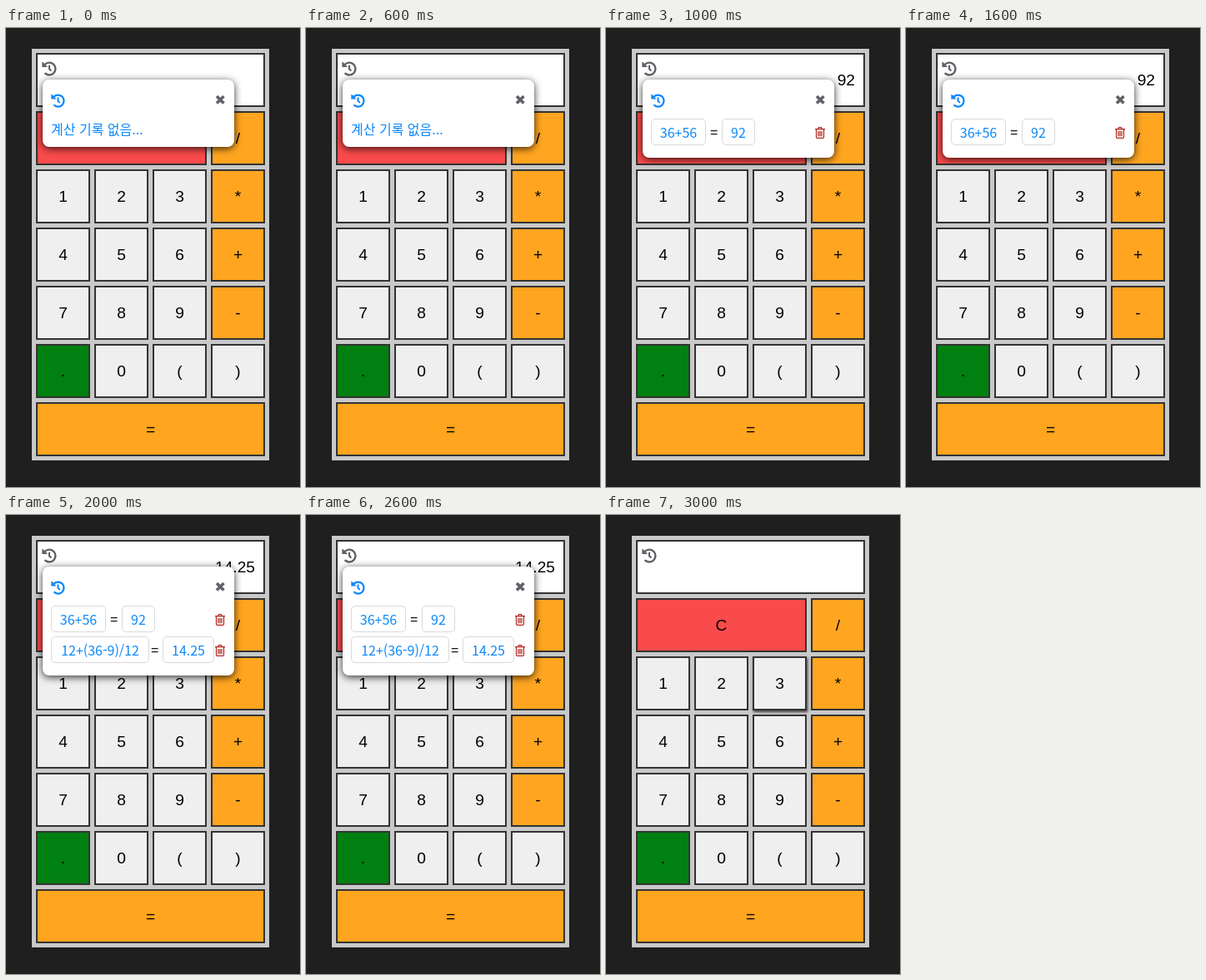
Write an HTML page that moves like this. It is 353 px wide and 552 px high and loops after 4 s.

```html
<!DOCTYPE html>
<html lang="ko">
<head>
<meta charset="utf-8">
<title>Calculator</title>
<style>
html, body { margin: 0; width: 100%; height: 100%; overflow: hidden; background: #1f1f1f; }
body { position: relative; font-family: "Liberation Sans", Arial, sans-serif; }
div, span, svg { position: absolute; box-sizing: border-box; }
#calc { left: 31px; top: 25px; width: 285px; height: 495px; background: #c9c9c9; }
.key {
  height: 65px; border: 2px solid #333; background: #efefef; color: #000;
  font-size: 19.2px; display: flex; align-items: center; justify-content: center;
}
.op { background: #ffa520; }
.clear { background: #f94b4b; }
.dot { background: #008010; }
.hover { box-shadow: 1px 2px 3px rgba(0,0,0,.7); }
#out { background: #fff; justify-content: flex-end; padding-right: 10px; }
#panel {
  left: 44px; top: 62px; width: 230px; border-radius: 8px; background: #fff;
  box-shadow: 0 2px 10px rgba(0,0,0,.8);
}
.kr { font: 16px/24px "Noto Sans CJK KR", "Noto Sans CJK", sans-serif; color: #0a88fb; white-space: nowrap; }
#empty { left: 10px; top: 47px; }
.row { left: 10px; width: 210px; height: 32px; }
.chip {
  top: 0; height: 32px; border: 1px solid #dadada; border-radius: 5px;
  line-height: 30px; text-align: center;
}
.eq { top: 8px; font-size: 16px; line-height: 18px; color: #111; }
svg { overflow: visible; }
</style>
</head>
<body>
<div id="calc"></div>
<svg width="0" height="0">
  <symbol id="history" viewBox="0 0 512 512">
    <path d="M107 107A211 211 0 1 1 122 420" fill="none" stroke="currentColor" stroke-width="68" stroke-linecap="round"/>
    <path d="M8 42Q12 14 35 27L181 173Q193 197 169 199H24Q8 199 8 183Z" fill="currentColor"/>
    <path d="M256 158V270L305 310" fill="none" stroke="currentColor" stroke-width="62" stroke-linecap="round" stroke-linejoin="round"/>
  </symbol>
  <symbol id="trash" viewBox="0 0 12 14">
    <path d="M0 2.6H12M3.6 2.4L4.4 .7H7.6L8.4 2.4M1.5 3V12.2Q1.5 13.3 2.6 13.3H9.4Q10.5 13.3 10.5 12.2V3M4 5V11.3M6 5V11.3M8 5V11.3"
      fill="none" stroke="currentColor" stroke-width="1.2"/>
  </symbol>
</svg>
<script>
const STEP = 1000;
const STATES = [
  { out: "", rows: 0, height: 81, panel: true },
  { out: "92", rows: 1, height: 94, panel: true },
  { out: "14.25", rows: 2, height: 131, panel: true },
  { out: "", rows: 0, height: 81, panel: false }
];
const HISTORY = [
  { expr: "36+56", value: "92", exprW: 66, eqX: 71, valueX: 85, valueW: 40 },
  { expr: "12+(36-9)/12", value: "14.25", exprW: 118, eqX: 120, valueX: 134, valueW: 62 }
];

function add(parent, cls, text, style) {
  const el = document.createElement("div");
  el.className = cls;
  el.textContent = text;
  Object.assign(el.style, style);
  parent.append(el);
  return el;
}
const px = n => n + "px";

function icon(parent, id, x, y, w, h, color) {
  parent.insertAdjacentHTML("beforeend",
    `<svg width="${w}" height="${h}" style="left:${x}px;top:${y}px;color:${color}"><use href="#${id}"/></svg>`);
}

function key(text, col, row, span = 1, cls = "") {
  return add(document.body, "key " + cls, text, {
    left: px(36 + col * 70), top: px(30 + row * 70), width: px(span * 70 - 5)
  });
}

const out = key("", 0, 0, 4);
out.id = "out";
key("C", 0, 1, 3, "clear");
key("/", 3, 1, 1, "op");
const keys = {};
["123*", "456+", "789-", ".0()"].forEach((line, r) =>
  [...line].forEach((ch, c) => {
    const cls = ch === "." ? "dot" : "*+-".includes(ch) ? "op" : "";
    keys[ch] = key(ch, c, r + 2, 1, cls);
  }));
key("=", 0, 6, 4, "op");
icon(document.body, "history", 43, 39.5, 18, 18, "#5f6368");

const panel = add(document.body, "", "", {});
panel.id = "panel";
icon(panel, "history", 9.5, 16.5, 17, 17, "#0a88fb");
panel.insertAdjacentHTML("beforeend",
  '<svg width="12" height="12" style="left:207px;top:18px"><path d="M2 2L10.5 10.5M10.5 2L2 10.5" stroke="#5f6368" stroke-width="3.6"/></svg>');
const empty = add(panel, "kr", "계산 기록 없음...", {});
empty.id = "empty";

const rows = HISTORY.map((h, i) => {
  const row = add(panel, "row", "", { top: px(47 + i * 37) });
  add(row, "kr chip", h.expr, { left: 0, width: px(h.exprW) });
  add(row, "eq", "=", { left: px(h.eqX) });
  add(row, "kr chip", h.value, { left: px(h.valueX), width: px(h.valueW) });
  icon(row, "trash", 197, 10, 12, 14, "#b3261e");
  return row;
});

let shown = -1;
function show(i) {
  const s = STATES[i];
  out.textContent = s.out;
  panel.style.display = s.panel ? "" : "none";
  panel.style.height = px(s.height);
  empty.style.display = s.rows ? "none" : "";
  rows.forEach((row, n) => row.style.display = n < s.rows ? "" : "none");
  keys[3].classList.toggle("hover", !s.panel);
}

const start = performance.now();
function tick(now) {
  const i = Math.floor(Math.max(0, now - start) / STEP) % STATES.length;
  if (i !== shown) show(shown = i);
  requestAnimationFrame(tick);
}
tick(start);
</script>
</body>
</html>
```
